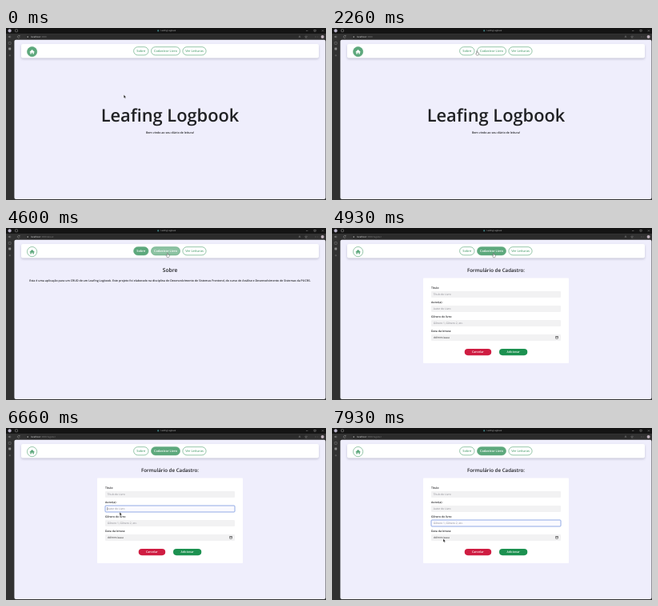
An HTML page that plays this animation: 400x215 px, repeating every 8 s.

```html
<!DOCTYPE html>
<html lang="pt-BR">
<head>
<meta charset="utf-8">
<title>Leafing Logbook</title>
<style>
html, body { margin: 0; width: 100%; height: 100%; overflow: hidden; background: #1b1b1b; }
svg { display: block; width: 100vw; height: 100vh; }
text { font-family: "Open Sans", "Noto Sans", sans-serif; fill: #202124; text-rendering: geometricPrecision; }
.mid { text-anchor: middle; }
.semi { font-weight: 600; }
</style>
</head>
<body>
<svg id="stage" viewBox="0 0 400 215">
  <defs>
    <filter id="soft" x="-10%" y="-40%" width="120%" height="200%"><feGaussianBlur stdDeviation="1.6"/></filter>
  </defs>
  <g id="chrome"></g>
  <rect x="10.4" y="14.8" width="389.1" height="199.3" rx="2" fill="#efeefc"/>
  <rect x="19" y="21.4" width="372" height="17.6" rx="2" fill="#8d8da5" opacity=".42" filter="url(#soft)"/>
  <rect x="19" y="20" width="372" height="17.6" rx="2" fill="#fff"/>
  <g id="nav"></g>
  <g id="home">
    <text class="mid semi" x="205" y="116.6" font-size="21.8">Leafing Logbook</text>
    <text class="mid semi" x="205" y="132.2" font-size="3.6">Bem vindo ao seu diário de leitura!</text>
  </g>
  <g id="about">
    <text class="mid semi" x="205" y="55" font-size="6.7">Sobre</text>
    <text class="mid semi" x="205" y="67.2" font-size="3.54">Esta é uma aplicação para um CRUD de um Leafing Logbook. Este projeto foi elaborado na disciplina de Desenvolvimento de Sistemas Frontend, do curso de Análise e Desenvolvimento de Sistemas da PUCRS.</text>
  </g>
  <g id="form"></g>
  <g id="cursor"></g>
</svg>
<script>
const LOOP = 8000, ABOUT_AT = 2680, FORM_AT = 4640;
const GREEN = [93, 168, 124], WHITE = [255, 255, 255], HOVER = [140, 194, 162];
const $ = id => document.getElementById(id);

function el(parent, tag, attrs, text) {
  const node = document.createElementNS('http://www.w3.org/2000/svg', tag);
  set(node, attrs);
  if (text) node.textContent = text;
  parent.appendChild(node);
  return node;
}
function set(node, attrs) {
  for (const key in attrs) node.setAttribute(key, attrs[key]);
}
const box = (parent, x, y, width, height, fill, more) =>
  el(parent, 'rect', { x, y, width, height, fill, ...more });
const label = (parent, x, y, size, text, more) =>
  el(parent, 'text', { x, y, 'font-size': size, ...more }, text);
const line = (parent, d, stroke, width = .5) =>
  el(parent, 'path', { d, stroke, 'stroke-width': width, fill: 'none' });
const style = fill => ({ style: 'fill:' + fill });

// Browser window
const chrome = $('chrome');
box(chrome, 0, 0, 400, 215, '#323232');
box(chrome, 0, 0, 400, 7, '#141414');
box(chrome, 25, 8.3, 351, 5.5, '#2b2b2b', { rx: 2.7 });
el(chrome, 'circle', { cx: 4.6, cy: 3.4, r: 2.1, fill: '#b9b4ca' });
box(chrome, 11.5, 1.8, 3, 3, 'none', { rx: .5, stroke: '#999', 'stroke-width': .5 });
el(chrome, 'circle', { cx: 190.2, cy: 3.4, r: 1.1, fill: '#3f7f80' });
label(chrome, 193.5, 4.4, 2.45, 'Leafing Logbook', style('#d0d0d0'));
line(chrome, 'M375 3.5h2.4M394.8 2.3l2.2 2.2M397 2.3l-2.2 2.2', '#aaa', .4);
box(chrome, 385, 2.3, 2.1, 2.1, 'none', { stroke: '#aaa', 'stroke-width': .4 });
line(chrome, 'M6.3 11H3.5M4.8 9.7L3.5 11l1.3 1.3', '#bbb');
line(chrome, 'M17 10a1.5 1.5 0 1 0 .2 1.5M17.2 9v1.2H16', '#aaa', .4);
box(chrome, 26.4, 10.4, 1.6, 1.4, '#999');
label(chrome, 31, 12, 2.85, 'localhost', style('#f0f0f0'));
const path = label(chrome, 43.4, 12, 2.85, ':3000', style('#848484'));
line(chrome, 'M366 12l1-2.4 1 2.4M366.4 11.2h1.2M375 9.6l.5 1h1l-.8.8.3 1-1-.5-1 .5.3-1-.8-.8h1z', '#999', .35);
line(chrome, 'M386 11h.4M387.5 11h.4M389 11h.4', '#aaa', .5);
el(chrome, 'circle', { cx: 395.6, cy: 11, r: 2, fill: '#c3b4c0' });
box(chrome, 3.2, 17.4, 3, 3, 'none', { rx: .6, stroke: '#888', 'stroke-width': .5 });
box(chrome, 3.2, 24.4, 3, 3, '#8a8a8a', { rx: .6 });
line(chrome, 'M3.6 34.3h2.4M4.8 33.1v2.4', '#888', .4);

// Navigation
const nav = $('nav');
const outline = { stroke: '#5da87c', 'stroke-width': .65 };
const house = el(nav, 'circle', { cx: 32.6, cy: 29.6, r: 6.1, ...outline });
const roof = el(nav, 'path', { d: 'M29.4 29.9l3.2-3 3.2 3-.5.5-.5-.4v2.5h-1.5v-1.7h-1.4v1.7h-1.5V30l-.5.4z' });
const pills = [['Sobre', 159.6, 18.4], ['Cadastrar Livro', 181.5, 36], ['Ver Leituras', 220.9, 29.2]]
  .map(([text, x, w]) => ({
    x, w,
    rect: box(nav, x, 23.7, w, 10.2, '#fff', { rx: 5.1, ...outline }),
    text: label(nav, x + w / 2, 30.3, 3.95, text, { class: 'mid semi' })
  }));

// Form
const form = $('form');
label(form, 205, 55, 6.2, 'Formulário de Cadastro:', { class: 'mid semi' });
box(form, 114, 62.5, 182, 106.5, '#fff', { rx: 1 });
const fields = [
  ['Título:', 'Título do Livro'],
  ['Autor(a):', 'Autor do Livro'],
  ['Gênero do livro:', 'Gênero 1, Gênero 2, etc.'],
  ['Data da leitura:', 'dd/mm/aaaa']
].map(([name, hint], i) => {
  const y = 79 + 18 * i;
  label(form, 124, y - 2.6, 3.4, name, { class: 'semi' });
  const rect = box(form, 124, y, 162, 8, '#f2f2f3', { rx: 1 });
  label(form, 126.8, y + 5.2, 3.3, hint, style(i < 3 ? '#85858c' : '#333'));
  return rect;
});
box(form, 279.8, 135.4, 2.8, 2.8, 'none', { stroke: '#333', 'stroke-width': .5 });
line(form, 'M279.8 136.3h2.8', '#333', .6);
const caret = line(form, '', '#222', .35);
[['Cancelar', 165.7, 33.5, '#cf1d42'], ['Adicionar', 209, 35.3, '#1c9150']].forEach(([text, x, w, fill]) => {
  box(form, x, 151, w, 8.2, fill, { rx: 4.1 });
  label(form, x + w / 2, 156.3, 3.5, text, { class: 'mid semi', ...style('#fff') });
});

// Pointer shapes, each with its hot spot at 0,0
const cursor = $('cursor');
const ink = { fill: '#111', stroke: '#fff', 'stroke-width': .35 };
const shapes = {
  arrow: el(cursor, 'path', { d: 'M0 0V4.1L1 3.2 1.7 4.7 2.4 4.4 1.7 3H3z', ...ink }),
  hand: el(cursor, 'path', { d: 'M-.5 0Q0-.6.5 0V1.8L2.4 2.3V4L1.7 5.3H-.5L-1.7 3.2-1.2 2.7-.5 3.2z', ...ink, fill: '#fff', stroke: '#222' }),
  beam: line(cursor, 'M-.8-2h1.6M0-2v4M-.8 2h1.6', '#222', .45)
};

// Pointer stops: time, x, y
const stops = [
  [0, 147.2, 83.5], [900, 147.2, 83.5], [1350, 158, 66], [1800, 172, 44], [2200, 181.2, 28.8],
  [2280, 181.2, 28.8], [2460, 170, 29.5], [3260, 170, 30], [3400, 185.6, 31.2], [3660, 201.5, 31],
  [5150, 202, 31.5], [5660, 147.5, 85], [6050, 147.5, 85], [6450, 142, 102],
  [6580, 142, 103], [6660, 142, 105.3], [6730, 142, 105.3], [7060, 140, 119],
  [7380, 140, 119], [7800, 139, 138.5], [LOOP, 139, 138.5]
];
const focusTimes = [5800, 6520, 7240];

const clamp = v => Math.max(0, Math.min(1, v));
const ease = v => v * v * (3 - 2 * v);
const mix = (a, b, k) => a.map((v, i) => v + (b[i] - v) * k);
const rgb = c => `rgb(${c.map(Math.round)})`;
const show = (node, on) => node.setAttribute('display', on ? 'inline' : 'none');

function pointer(t) {
  const i = stops.findIndex(s => s[0] > t);
  const a = stops[i - 1], b = stops[i];
  return mix(a.slice(1), b.slice(1), ease((t - a[0]) / (b[0] - a[0])));
}

function paintPill(pill, fill) {
  const k = clamp((255 - fill[0]) / (255 - HOVER[0]));
  set(pill.rect, { fill: rgb(fill) });
  pill.text.style.fill = rgb(mix(GREEN, WHITE, k));
}

function render(t) {
  const page = t < ABOUT_AT ? 0 : t < FORM_AT ? 1 : 2;
  ['home', 'about', 'form'].forEach((id, i) => show($(id), i === page));
  path.textContent = ':3000' + ['', '/about', '/register'][page];

  const [x, y] = pointer(t);
  set(cursor, { transform: `translate(${x} ${y})` });

  const fade = at => clamp((t - at) / 180);
  const left = fade(ABOUT_AT);
  set(house, { fill: rgb(mix(GREEN, WHITE, left)) });
  set(roof, { fill: rgb(mix(WHITE, GREEN, left)) });
  const about = mix(mix(WHITE, HOVER, fade(2380)), GREEN, left);
  paintPill(pills[0], mix(about, WHITE, fade(FORM_AT)));
  paintPill(pills[1], mix(mix(WHITE, HOVER, fade(3440)), GREEN, fade(FORM_AT)));
  paintPill(pills[2], WHITE);

  const focus = focusTimes.filter(at => t >= at).length - 1;
  fields.forEach((rect, i) => set(rect, i === focus
    ? { stroke: '#7796df', 'stroke-width': .8, fill: '#fafaff' }
    : { stroke: 'none', fill: '#f2f2f3' }));
  const blink = focus >= 0 && (t - focusTimes[focus]) % 1000 < 500;
  set(caret, { d: blink ? `M126.6 ${81 + 18 * focus}v4` : '' });

  const onPill = y > 23.7 && y < 33.9 && pills.some(p => x > p.x - 1 && x < p.x + p.w);
  const onField = page === 2 && x > 124 && x < 286 && [79, 97, 115].some(top => y > top && y < top + 8);
  const shape = onPill ? 'hand' : onField ? 'beam' : 'arrow';
  for (const key in shapes) show(shapes[key], key === shape);
}

const start = performance.now();
function tick() {
  render((performance.now() - start) % LOOP);
  requestAnimationFrame(tick);
}
tick();
</script>
</body>
</html>
```
